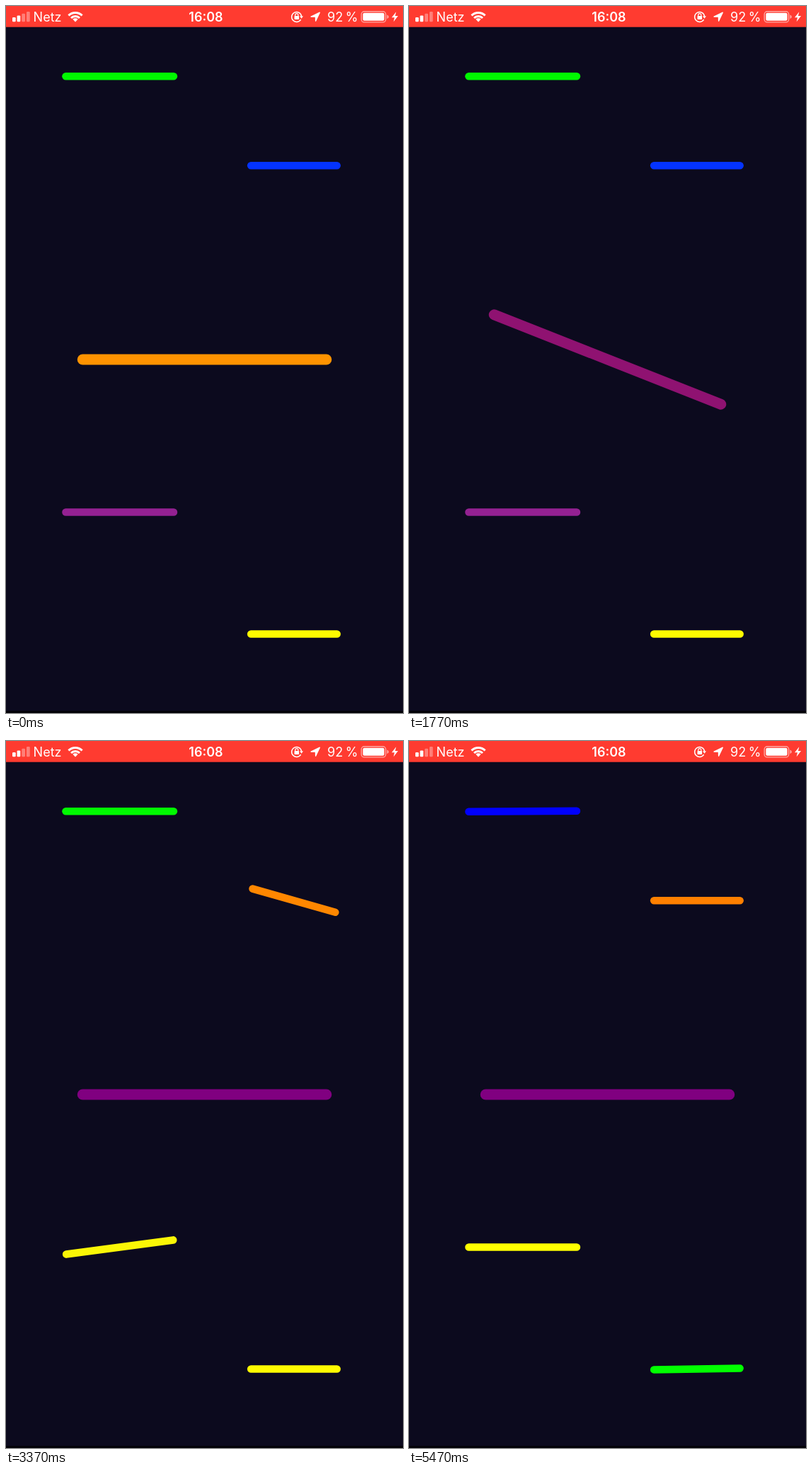
These frames come from a looping animation (561x998 px, 5.57 s). An HTML page:

```html
<!DOCTYPE html>
<html lang="de">
<head>
<meta charset="utf-8">
<title>Rotating bars</title>
<style>
  html, body { margin: 0; width: 100%; height: 100%; overflow: hidden; background: #0c0a1e; }
  svg { display: block; width: 100vw; height: 100vh; }
  text { font: 18px Inter, Roboto, sans-serif; fill: #fff; }
  .clock { font-weight: 600; text-anchor: middle; }
  .bar { stroke-linecap: round; }
</style>
</head>
<body>
<svg viewBox="0 0 561 998">
  <rect width="561" height="998" fill="#0c0a1e"/>
  <rect y="995" width="561" height="3" fill="#030208"/>
  <g id="bars"></g>

  <rect width="561" height="29.7" fill="#ff3b30"/>
  <g fill="#fff">
    <rect x="9" y="16" width="4.7" height="6.3" rx="1.2"/>
    <rect x="15.6" y="13.4" width="4.7" height="8.9" rx="1.2"/>
    <g opacity=".35">
      <rect x="22.3" y="10.7" width="4.7" height="11.6" rx="1.2"/>
      <rect x="29" y="8" width="4.7" height="14.3" rx="1.2"/>
    </g>
  </g>
  <text x="38.6" y="22" textLength="">Netz</text>
  <g fill="none" stroke="#fff" stroke-width="3">
    <path d="M88.4 13.4a13.6 13.6 0 0 1 19.2 0"/>
    <path d="M92 17a8.5 8.5 0 0 1 12 0"/>
  </g>
  <path d="M94.4 18.8a5.2 5.2 0 0 1 7.2 0L98 22.5z" fill="#fff"/>
  <text class="clock" x="282.5" y="22">16:08</text>

  <g fill="none" stroke="#fff" stroke-width="1.5">
    <path d="M416.6 19.2a7 7 0 1 1 1-4.6"/>
    <path d="M408.7 14.5v-1.8a2.1 2.1 0 0 1 4.2 0v1.8" stroke-width="1.2"/>
  </g>
  <path d="M415 14.2h5l-2.5 3.6z" fill="#fff"/>
  <rect x="407.5" y="14" width="6.6" height="5" rx=".8" fill="#fff"/>
  <path id="arrow" d="M443.3 9.2L437.6 21.2L437.4 15.2L431 15z"
        fill="#fff" stroke="#fff" stroke-width="1.3" stroke-linejoin="round"/>
  <text x="454" y="22" word-spacing="-1.5">92 %</text>
  <rect x="502.2" y="7.7" width="34.4" height="15.2" rx="4" fill="none"
        stroke="#fff" stroke-opacity=".55" stroke-width="1.4"/>
  <rect x="504.3" y="9.8" width="30.2" height="11" rx="2" fill="#fff"/>
  <path d="M538.4 12.6q2.4 .6 2.4 2.7t-2.4 2.7z" fill="#fff" opacity=".55"/>
  <path d="M551.3 8.3L545 16.3h4l-1.4 6L554 14h-4.1z" fill="#fff"/>
</svg>
<script>
const LOOP = 5570, FIRST = 1070, STEP = 100;

// Progress curves: seconds since start -> share of the half turn
const ease = t => t > 1.05 ? 1 : (1 - Math.cos(Math.PI * t / 1.05)) / 2;
const bouncy = t => {
  const w = 13.3, a = 3.43;
  return t > 1.4 ? 1 : 1 - Math.exp(-a * t) * (Math.cos(w * t) + a / w * Math.sin(w * t));
};
const damped = t => {
  const s = 4.65, f = 40;
  return 1 - (f * Math.exp(-s * t) - s * Math.exp(-f * t)) / (f - s);
};

const bars = [
  { x: 160.7, y: 99.3,  len: 163,   h: 10.6, from: [0, 249, 0],    to: [0, 0, 255],   start: 4106, dir: 1,  curve: damped },
  { x: 406.9, y: 225.2, len: 132,   h: 10.6, from: [4, 51, 255],   to: [255, 128, 0], start: 2663, dir: 1,  curve: bouncy },
  { x: 280.5, y: 499,   len: 359.5, h: 15,   from: [255, 147, 0],  to: [128, 0, 128], start: 956,  dir: -1, curve: ease },
  { x: 160.7, y: 714.5, len: 163,   h: 10.6, from: [148, 33, 146], to: [255, 255, 0], start: 2663, dir: 1,  curve: damped },
  { x: 406.9, y: 886.5, len: 132,   h: 10.6, from: [255, 251, 0],  to: [0, 255, 0],   start: 4106, dir: 1,  curve: bouncy }
];

const group = document.getElementById('bars');
const arrow = document.getElementById('arrow');

for (const b of bars) {
  const half = (b.len - b.h) / 2;
  b.el = document.createElementNS('http://www.w3.org/2000/svg', 'line');
  b.el.setAttribute('class', 'bar');
  b.el.setAttribute('x1', -half);
  b.el.setAttribute('x2', half);
  b.el.setAttribute('stroke-width', b.h);
  group.append(b.el);
}

// Overshooting colours are clamped to the valid range
const mix = (from, to, p) => 'rgb(' + from.map((v, i) =>
  Math.round(Math.min(255, Math.max(0, v + (to[i] - v) * p)))).join(',') + ')';

function draw(ms) {
  const t = ms < FIRST ? 0 : FIRST + Math.floor((ms - FIRST) / STEP) * STEP;
  for (const b of bars) {
    const p = t > b.start ? b.curve((t - b.start) / 1000) : 0;
    b.el.setAttribute('transform', `translate(${b.x} ${b.y}) rotate(${b.dir * 180 * p})`);
    b.el.setAttribute('stroke', mix(b.from, b.to, p));
  }
  arrow.setAttribute('fill', t >= 3470 && t < 4970 ? 'none' : '#fff');
}

const begin = performance.now();
function tick() {
  draw((performance.now() - begin) % LOOP);
  requestAnimationFrame(tick);
}
tick();
</script>
</body>
</html>
```
